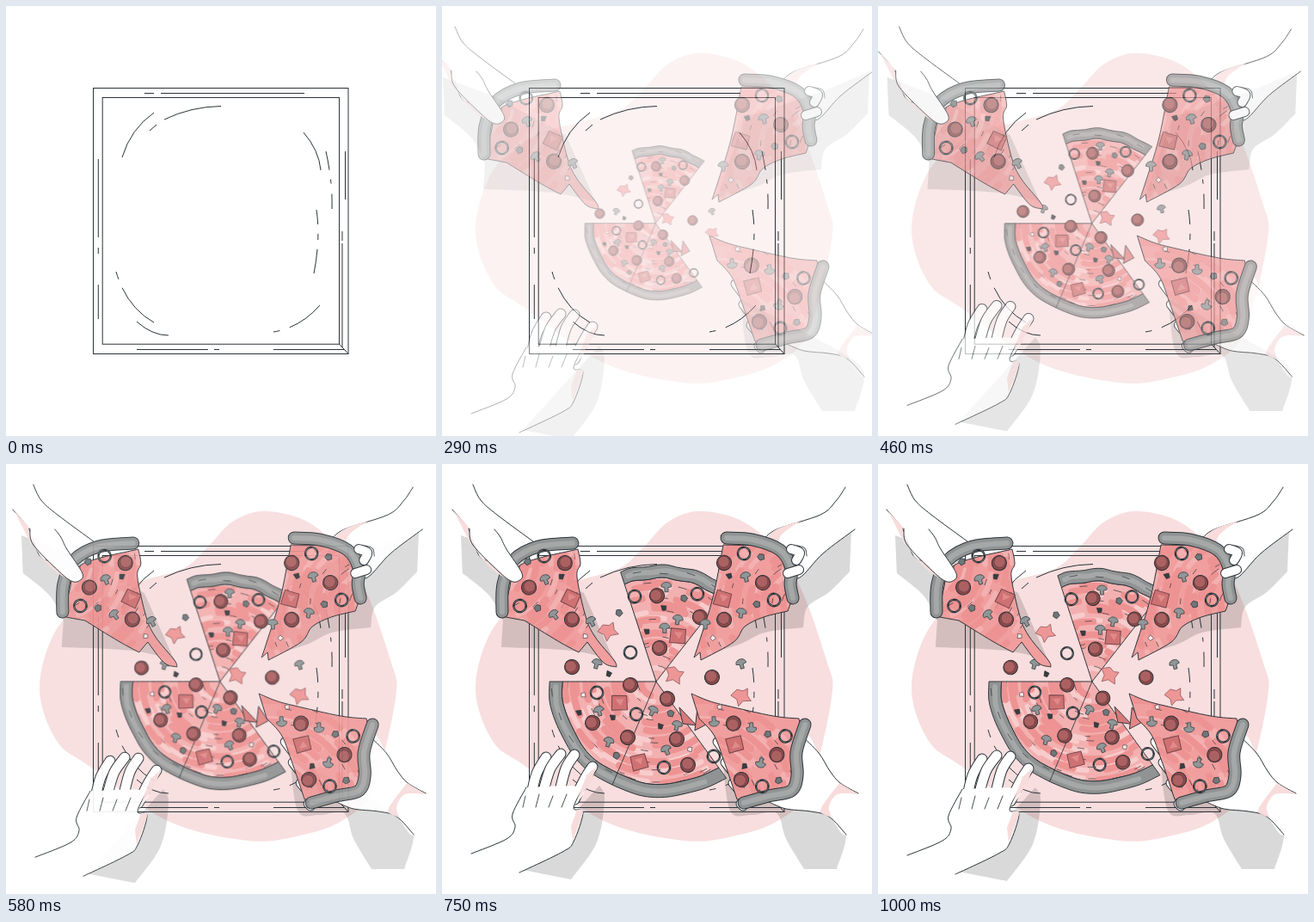
Recreate the animation shown at these times as an HTML page. Size 500 px wide and 500 px high, loop 1.04 s.

```html
<!DOCTYPE html>
<html lang="en">
<head>
<meta charset="utf-8">
<title>Sharing a pizza</title>
<style>
html, body { margin: 0; width: 100%; height: 100%; overflow: hidden; background: #fff; }
svg { display: block; width: 100vw; height: 100vh; }
</style>
</head>
<body>
<svg id="stage" viewBox="0 0 500 500"></svg>
<script>
const INK = '#2b3338', PINK = '#f8dcdc', LIGHT = '#f8cccc', MID = '#f3b0b0', DEEP = '#ee9393';
const stage = document.getElementById('stage');

function add(parent, tag, attrs = {}) {
  const node = document.createElementNS('http://www.w3.org/2000/svg', tag);
  for (const key in attrs) node.setAttribute(key, attrs[key]);
  parent.appendChild(node);
  return node;
}
const group = (parent, attrs) => add(parent, 'g', attrs);

let seed = 7;
const random = () => (seed = seed * 16807 % 2147483647) / 2147483647;
const between = (a, b) => a + (b - a) * random();

// Smooth curve through "x,y" points; "!" after a point makes a corner.
function curve(text, closed) {
  const pts = [];
  for (const word of text.trim().split(/\s+/)) {
    const pt = word.replace('!', '').split(',').map(Number);
    pts.push(pt);
    if (word.endsWith('!')) pts.push(pt);
  }
  const n = pts.length;
  const at = i => closed ? pts[(i + n) % n] : pts[Math.max(0, Math.min(n - 1, i))];
  const toward = (p, a, b) => p.map((v, k) => v + (b[k] - a[k]) / 6);
  let d = 'M' + pts[0];
  for (let i = 0; i < (closed ? n : n - 1); i++) {
    const [a, b, c, e] = [at(i - 1), at(i), at(i + 1), at(i + 2)];
    if (b !== c) d += `C${toward(b, a, c)} ${toward(c, e, b)} ${c}`;
  }
  return closed ? d + 'Z' : d;
}
const fill = (g, pts, color, stroke = 'none') =>
  add(g, 'path', { d: curve(pts, true), fill: color, stroke, 'stroke-linejoin': 'round' });
const line = (g, pts, width = 1, stroke = INK) => add(g, 'path', {
  d: curve(pts), fill: 'none', stroke, 'stroke-width': width, 'stroke-linecap': 'round', 'stroke-linejoin': 'round'
});
const dashes = (g, d, pattern = 'none') =>
  add(g, 'path', { d, fill: 'none', stroke: INK, 'stroke-dasharray': pattern });

// White skin between two outlines that stay open at the wrist.
function skin(g, one, two) {
  fill(g, one + '! ' + two + '!', '#fff');
  line(g, one);
  line(g, two);
}
function finger(g, pts, width = 11) {
  line(g, pts, width + 2);
  line(g, pts, width, '#fff');
}

let clips = 0;
function cheese(g, pts, cx, cy, base, light, dark) {
  const id = 'clip' + clips++;
  fill(add(g, 'clipPath', { id }), pts, '#000');
  fill(g, pts, base);
  const inside = group(g, { 'clip-path': `url(#${id})`, fill: 'none', 'stroke-linecap': 'round' });
  for (let r = 20; r < 130; r += 9) {
    for (const [color, width, on, off] of [[light, 6, 25, 45], [dark, 8, 35, 40], [INK, 0.7, 8, 70]])
      add(inside, 'circle', {
        cx, cy, r: r + between(-4, 4), stroke: color, 'stroke-width': width,
        'stroke-dasharray': `${between(0.6, 1.3) * on} ${off}`, 'stroke-dashoffset': between(0, 90)
      });
  }
  fill(g, pts, 'none', INK);
}

const SHAPES = {
  p(g) {
    add(g, 'circle', { r: 8.6, fill: '#8b4a4b', stroke: INK });
    add(g, 'circle', { cx: -1, cy: -1, r: 6.6, fill: '#ab6162', stroke: '#61383b', 'stroke-width': 0.6 });
  },
  r(g) {
    add(g, 'circle', { r: 7.2, fill: 'none', stroke: INK, 'stroke-width': 2.4 });
    add(g, 'circle', { r: 7.2, fill: 'none', stroke: '#777d80', 'stroke-width': 0.8, 'stroke-dasharray': '7 4' });
  },
  q(g) {
    add(g, 'path', { d: 'M-9,-8L8,-9 10,7-8,9Z', fill: '#cf7172', stroke: '#71454a' });
    add(g, 'path', { d: 'M-5,-4L5,-5 2,3Z', fill: '#e08a8a' });
  },
  m: g => add(g, 'path', { d: 'M-6,0C-6,-7 6,-7 6,0L2,1 2,6-2,6-2,1Z', fill: '#8f9697', stroke: '#454d51', 'stroke-width': 0.9 }),
  s: g => add(g, 'path', { d: 'M-2,-9L4,-5 10,-6 7,2 9,9 0,6-7,10-6,2-11,-5Z', fill: '#ee9696', stroke: '#955f63', 'stroke-width': 0.8 }),
  d: g => add(g, 'path', { d: 'M-3,-3L3,-2 2,3-2,3Z', fill: '#373d41', stroke: INK, 'stroke-width': 0.7 }),
  h: g => add(g, 'path', { d: 'M-4,-2L0,-4 4,-1 2,4-3,3Z', fill: '#6e7779', stroke: INK, 'stroke-width': 0.7 }),
  w: g => add(g, 'path', { d: 'M-3,-1L1,-3 3,2-2,3Z', fill: '#fbeaea', stroke: '#5c5053', 'stroke-width': 0.7 })
};
const place = (g, kind, x, y) =>
  SHAPES[kind](group(g, { transform: `translate(${x} ${y}) rotate(${between(-30, 30)})` }));

// "p 1,2 3,4 r 5,6": a kind, then its places. Returns the places.
function toppings(g, text) {
  let kind;
  const spots = [];
  for (const word of text.split(' ')) {
    if (SHAPES[word]) { kind = word; continue; }
    const [x, y] = word.split(',').map(Number);
    place(g, kind, x, y);
    spots.push([x, y]);
  }
  return spots;
}

const under = group(stage);
const box = group(stage);
const art = group(stage);
const shade = {}, part = {};

fill(under, '305,55 360,73 410,130 447,228 453,272 427,377 392,414 342,432 282,438 188,415 98,352 59,322 39,260 60,190 108,151 160,135 207,121 235,96 265,66', '#f8dede');

const SHADOWS = {
  tl: '22,83! 82,105! 165,150! 200,228! 150,217 69,213! 71,182! 55,153 24,127!',
  tr: '476,76! 474,125! 450,149 425,166 420,190! 375,196 345,210 299,224! 330,130! 425,98!',
  br: '326,340! 335,403 360,408 389,406 400,436 421,471! 459,471! 469,424 430,395!',
  bl: '183,374! 189,390 180,440 150,483! 94,472! 150,410!'
};
for (const key in SHADOWS) {
  shade[key] = group(under, { opacity: 0.15 });
  fill(shade[key], SHADOWS[key], '#000');
  part[key] = group(art);
}

// Box: two frames, marks along the sides, marks of a round lid
for (const [x, y, w, h] of [[101.5, 95.5, 296.5, 309], [112.2, 106.5, 275.3, 286.7]])
  add(box, 'rect', { x, y, width: w, height: h, fill: 'none', stroke: INK });
dashes(box, 'M161,101.5H347', '11 8 167');
dashes(box, 'M107.3,178V364', '91 12 7 36 40');
dashes(box, 'M152,399.5H393', '83 7 6 63 82');
dashes(box, 'M394.5,169V225M387.5,393L398,404.5');
dashes(box, 'M391,262V397', '11 3 121');
dashes(box, 'M135,176Q145,143 172,124M167,145L175,138M184,132Q215,117 250,116.5M346,147Q364,168 366,191M152,367Q170,383 189,383');
dashes(box, 'M372,169Q380,205 379,236', '22 11 5 12 20');
dashes(box, 'M361,237Q366,270 358,311', '17 11 7 11 30');
dashes(box, 'M365,348Q342,374 311,379', '44 12 8');
dashes(box, 'M128,309Q140,350 172,368', '9 11 70');

// Pizza in the middle, drawn in polar form around its tip
const pie = part.pie = group(art);
art.prepend(pie);
const TIP = [249, 253];
function polar(r, deg) {
  const a = deg * Math.PI / 180;
  return `${(TIP[0] + r * Math.cos(a)).toFixed(1)},${(TIP[1] + r * Math.sin(a)).toFixed(1)}`;
}
function arc(r0, r1, a0, a1) {
  return Array.from({ length: 13 }, (_, i) =>
    polar(r0 + (r1 - r0) * i / 12 + Math.sin(i * 1.7), a0 + (a1 - a0) * i / 12));
}
function piece(a0, a1, r0, r1) {
  const thick = 15;
  const outer = arc(r0, r1, a0, a1), inner = arc(r0 - thick, r1 - thick, a0, a1);
  cheese(pie, `${TIP}! ${inner[0]}! ${inner.slice(1, -1).join(' ')} ${inner[12]}!`, ...TIP, MID, LIGHT, DEEP);
  fill(pie, `${outer[0]}! ${outer.slice(1, -1).join(' ')} ${outer[12]}! ${inner[12]}! ${inner.slice(1, -1).reverse().join(' ')} ${inner[0]}!`, '#909393', INK);
  line(pie, arc(r0 - 7, r1 - 7, a0 + Math.sign(a1 - a0) * 3, a1).slice(0, -1).join(' '), 6, '#a6a8a8');
  for (let a = Math.min(a0, a1) + 6; a < Math.max(a0, a1) - 5; a += 14) {
    const r = between(r0 - 8, r0 - 2);
    line(pie, polar(r, a) + ' ' + polar(r, a + 4), 0.7);
  }
}
piece(-108, -52, 134, 138);
piece(180, 54, 124, 138);
line(pie, polar(0, 113) + ' ' + polar(130, 113), 0.9);
fill(pie, '276,283! 296,304! 280,302!', '#d67979', INK);
fill(pie, '297,284! 309,302! 294,310!', '#e38686', INK);

const spots = toppings(pie, 'p 250,153 253,214 300,178 175,301 216,318 219,257 262,273 273,320 286,350 r 224,154 297,151 180,266 226,291 258,353 316,340 q 274,200 206,278 229,347');
function scatter(kinds, a0, a1, r0, r1) {
  for (const kind of kinds) {
    let x, y, tries = 0;
    do [x, y] = polar(between(r0, r1), between(a0, a1)).split(',').map(Number);
    while (spots.some(s => Math.hypot(s[0] - x, s[1] - y) < 15) && ++tries < 60);
    place(pie, kind, x, y);
    spots.push([x, y]);
  }
}
scatter('mmmdhd', -104, -58, 30, 112);
scatter('mmmmmhdhdwdw', 62, 174, 25, 104);
toppings(pie, 'p 151,236 314,248 r 219,219 s 193,194 348,270 270,245 m 180,232 348,232 h 206,173 d 194,244');

// Slices in hands share one arrangement of toppings, mirrored and turned.
const SLICE = 'p 328,115 373,138 328,181 r 351,104 386,158 q 326,157 m 353,131 348,173 306,186 h 371,108 366,163 d 334,130 w 315,202';
function slice(g, outline, rim, cx, cy, turn) {
  cheese(g, outline, cx, cy, '#f09e9e', '#f3b0b0', DEEP);
  line(g, rim, 15);
  line(g, rim, 13, '#909393');
  line(g, rim, 6, '#a6a8a8');
  toppings(group(g, { transform: turn }), SLICE);
}

// Upper left
const { tl, tr, br, bl } = part;
skin(tl, '36,24 45,42 64,59 106,90', '88,104 48,111 31,76 12,53');
fill(tl, '14,55! 30,72! 35,93 50,110! 33,92!', PINK);
slice(tl, '74,178! 78,147 92,117 158,99! 161,116 157,131 167,177 178,201 200,228 203,236! 188,231 169,207! 159,219! 135,206 96,182!',
  '70,172 71,140 83,112 112,96 152,92', 60, 115, 'rotate(-7 146 140) translate(474 0) scale(-1 1)');
fill(tl, '32,75! 36,94 66,125 80,136 89,136 93,127 75,99 68,85! 52,66!', '#fff');
fill(tl, '34,83! 40,101 58,118 82,137! 63,126 44,108!', PINK);
line(tl, '32,75 36,94 66,125 80,136 89,136 93,127 75,99 68,85 61,76');

// Upper right
skin(tr, '469,27 458,43 440,59 389,76 373,89', '400,128 416,132 443,104 480,76');
fill(tr, '375,89! 389,76 417,66! 395,82 391,96!', PINK);
slice(tr, '327,94! 315,155 299,207 293,225! 300,219! 301,228! 339,207 352,189 374,178 402,171! 406,160! 404,125 385,95!',
  '331,86 361,88 393,100 406,121 405,140 408,156', 420, 165, '');
for (const pts of ['412,112 416,103 406,99', '402,127 415,123']) finger(tr, pts, 10);
line(tr, '413,95 422,98 424,107', 0.9);

// Lower right
skin(br, '418,316 438,336 451,357 463,371 484,383', '470,431 450,410 429,404 400,401 380,393');
fill(br, '462,371! 484,384! 460,384 450,398 453,411! 440,404 448,389!', PINK);
for (let i = 0; i < 4; i++) finger(br, `${320 + 9 * i},${323 + 24 * i} ${329 + 7 * i},${335 + 21 * i}`, 9);
slice(br, '290,267! 309,275 331,281 385,293 415,296! 417,320 408,383! 343,390! 327,343 316,315 299,296!',
  '422,303 412,335 413,362 406,380 380,386 351,394', 300, 400, 'translate(298 263) rotate(-8) scale(1 -1) translate(-293 -225)');

// Lower left: fingers, then the back of the hand over their roots
const fingers = ['104,384 110,360 121,341', '119,376 126,354 138,337', '137,380 144,354 154,338', '154,390 166,366 175,352'];
fingers.forEach(pts => finger(bl, pts));
skin(bl, '34,453 75,436 85,422 82,407 98,376', '164,376 153,400 164,405 153,439 140,451 90,475');
fill(bl, '157,402! 164,405 152,438! 150,421!', PINK);
fill(bl, '180,351! 172,371 157,391! 168,362!', PINK);
for (let i = 0; i < 4; i++) line(bl, `${97 + 16 * i},${386 - 2 * i % 4} ${94 + 15 * i},${399}`, 0.9);

// One loop: everything slides in and fades up, then drifts back a little.
const LOOP = 1040, FPS = 24, PEAK = 16;
const clamp = v => Math.max(0, Math.min(1, v));

function draw(ms) {
  const step = Math.ceil((Math.floor(ms / 10) * 10 + 5) * FPS / 1000) - 1;
  const alpha = clamp((step - 2) / 13);
  const move = 0.6 - (step < PEAK ? 2.4 * (PEAK - step) : 0.33 * (step - PEAK));
  const shift = { tl: [move, 0], tr: [-move, 0], br: [-move, 0], bl: [0, -move] };
  for (const layer of [under, art]) layer.setAttribute('opacity', alpha);
  for (const key in shift)
    for (const g of [shade[key], part[key]]) g.setAttribute('transform', `translate(${shift[key]})`);
  pie.setAttribute('transform', `translate(247 252) scale(${1 + move * 0.0161}) translate(-247 -252)`);
}

const start = performance.now();
function tick() {
  draw((performance.now() - start) % LOOP);
  requestAnimationFrame(tick);
}
tick();
</script>
</body>
</html>
```
